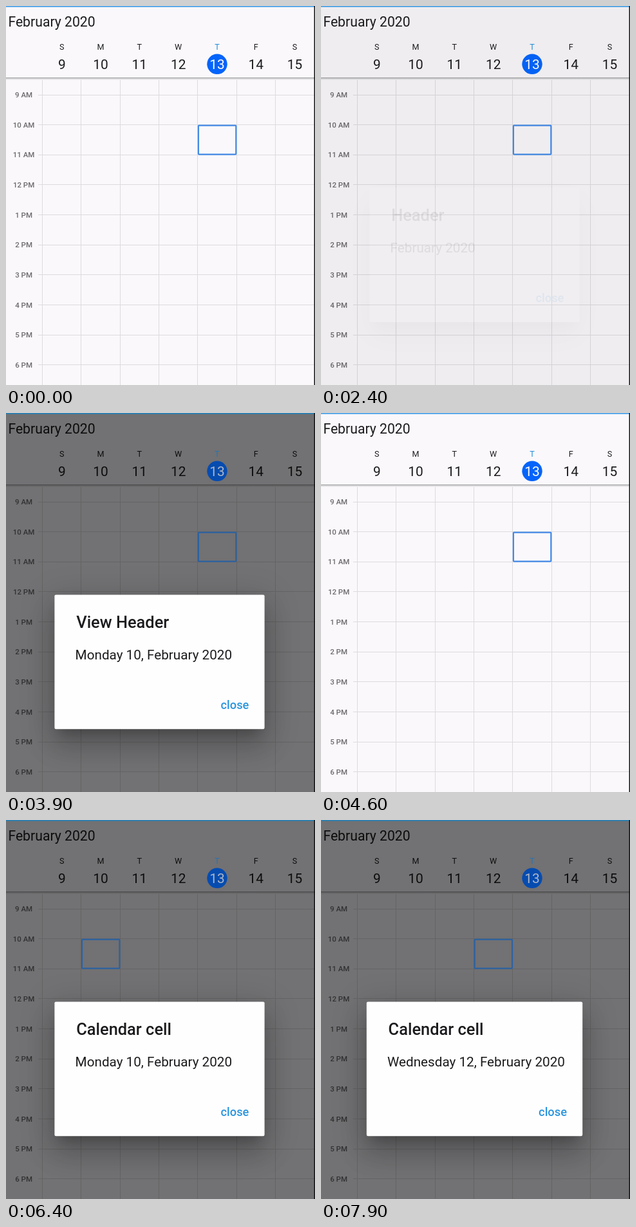
Recreate the animation shown at these times as an HTML page. Size 480 by 589 pixels, loop 8000 ms.

```html
<!DOCTYPE html>
<html lang="en">
<head>
<meta charset="utf-8">
<title>Calendar taps</title>
<style>
  html, body { margin: 0; width: 100%; height: 100%; overflow: hidden; background: #faf8fb; }
  svg { display: block; width: 480px; height: 589px; font-family: Roboto, "Liberation Sans", sans-serif; }
  .mid { text-anchor: middle; }
  .hour { font-size: 11.5px; font-weight: 500; fill: #6c6a6d; }
  .day { font-size: 12.6px; }
  .date { font-size: 20.9px; }
  .shadow { fill: #000; }
</style>
</head>
<body>
<svg viewBox="0 0 480 589">
  <defs>
    <linearGradient id="edge" x2="0" y2="1">
      <stop offset="0" stop-color="#9c9b9d"/>
      <stop offset=".35" stop-color="#c9c8ca"/>
      <stop offset="1" stop-color="#faf8fb"/>
    </linearGradient>
  </defs>
  <rect width="480" height="589" fill="#faf8fb"/>
  <g id="grid" stroke="#dddbde" stroke-width="1"></g>
  <rect y="111" width="479" height="4" fill="url(#edge)"/>
  <g id="labels" fill="#1c1b1d">
    <text x="3.4" y="32" font-size="21.2">February 2020</text>
  </g>
  <rect id="barrier" width="480" height="589" opacity="0"/>
  <g id="accents">
    <rect id="bar" width="480" height="1.6"/>
    <circle id="today" cx="328" cy="90.3" r="15.7"/>
    <text id="todayDay" class="mid day" x="327.9" y="68.4">T</text>
    <text id="todayDate" class="mid date" x="327.9" y="97.8">13</text>
    <rect id="cell" y="185.7" width="58.4" height="44.9" rx="1" fill="none" stroke-width="2.2"/>
  </g>
  <rect x="478.6" width="1.4" height="589" fill="#0c0b0d"/>
  <g id="dialog" opacity="0">
    <g id="shadows"></g>
    <rect id="card" y="282.4" height="208.8" rx="2.2" fill="#fffeff"/>
    <text id="title" y="333.8" font-size="25.4" font-weight="500" fill="#1c1b1d"></text>
    <text id="body" y="383" font-size="20.7" fill="#1c1b1d"></text>
    <text id="close" y="460.2" font-size="18.3" font-weight="500" fill="#2b95de" text-anchor="end">close</text>
  </g>
</svg>
<script>
const $ = id => document.getElementById(id);
const LOOP = 8000, STEP = 100;
const COL = 60.3, LEFT = 56.6, ROW = 46.65, TOP = 138;

function add(parent, tag, attrs, text) {
  const el = document.createElementNS('http://www.w3.org/2000/svg', tag);
  for (const k in attrs) el.setAttribute(k, attrs[k]);
  if (text) el.textContent = text;
  parent.append(el);
  return el;
}
function set(el, attrs) {
  for (const k in attrs) el.setAttribute(k, attrs[k]);
}

// Week columns; today's column is drawn with the accents
'SMTWTFS'.split('').forEach((d, i) => {
  const x = LEFT + COL * i, mid = x + COL / 2;
  const line = Math.floor(x) + .5;
  add($('grid'), 'line', { x1: line, x2: line, y1: 112, y2: 589 });
  if (i === 4) return;
  add($('labels'), 'text', { class: 'mid day', x: mid, y: 68.4 }, d);
  add($('labels'), 'text', { class: 'mid date', x: mid, y: 97.8 }, String(9 + i));
});

// Hour rows
for (let i = 0; i < 10; i++) {
  const y = TOP + ROW * i, h = 9 + i;
  const line = Math.floor(y) + .5;
  add($('grid'), 'line', { x1: 50, x2: 479, y1: line, y2: line });
  add($('labels'), 'text', { class: 'mid hour', x: 27.6, y: y + 4.1 },
    `${h > 12 ? h - 12 : h} ${h < 12 ? 'AM' : 'PM'}`);
}

// Card shadow layers: offset, blur, spread, opacity
const shadows = [[13, 9, -8, .2], [28, 21, 3, .15], [10, 26, 9, .13]].map(([dy, blur, grow, alpha]) => ({
  grow,
  el: add($('shadows'), 'rect', {
    class: 'shadow', y: 282.4 + dy - grow, height: 208.8 + 2 * grow,
    opacity: alpha, style: `filter:blur(${blur}px)`
  })
}));

// open, close, card left edge, title, body
const dialogs = [
  [300, 2300, 75.4, 'Header', 'February 2020'],
  [2900, 4100, 75.4, 'View Header', 'Monday 10, February 2020'],
  [5600, 6700, 75.4, 'Calendar cell', 'Monday 10, February 2020'],
  [7300, LOOP, 70.8, 'Calendar cell', 'Wednesday 12, February 2020']
];
// time, selected column
const picks = [[0, 4], [5600, 1], [7300, 3]];
const FADE_IN = [.45, .92], FADE_OUT = [.55, .08];

// Accent colours: normal, dimmed
const tints = [
  ['bar', 'fill', [62, 156, 230], [34, 128, 184]],
  ['today', 'fill', [5, 100, 250], [6, 76, 176]],
  ['todayDay', 'fill', [36, 142, 218], [40, 116, 176]],
  ['todayDate', 'fill', [255, 255, 255], [172, 182, 198]],
  ['cell', 'stroke', [68, 138, 230], [44, 98, 162]]
];

function shown(t, [open, close]) {
  if (t < open) return 0;
  if (t < close) return FADE_IN[(t - open) / STEP] ?? 1;
  return FADE_OUT[(t - close) / STEP] ?? 0;
}

function fillDialog([, , x, title, body]) {
  const w = 477 - 2 * x;
  set($('card'), { x, width: w });
  for (const s of shadows) set(s.el, { x: x - s.grow, width: w + 2 * s.grow });
  set($('title'), { x: x + 33.8 });
  set($('body'), { x: x + 32.2 });
  set($('close'), { x: x + w - 24.2 });
  $('title').textContent = title;
  $('body').textContent = body;
}

let last = -1;
function draw(now) {
  const t = Math.floor(now % LOOP / STEP) * STEP;
  if (t !== last) {
    last = t;
    const d = dialogs.findLast(d => t >= d[0]) || dialogs[0];
    const p = shown(t, d);
    fillDialog(d);
    set($('dialog'), { opacity: p });
    set($('barrier'), { opacity: .54 * p });
    for (const [id, prop, a, b] of tints)
      set($(id), { [prop]: `rgb(${a.map((v, i) => Math.round(v + (b[i] - v) * p))})` });
    const col = picks.findLast(k => t >= k[0])[1];
    set($('cell'), { x: LEFT + COL * col + 1.1 });
  }
}
const start = performance.now();
function tick() {
  draw(performance.now() - start);
  requestAnimationFrame(tick);
}
tick();
</script>
</body>
</html>
```
